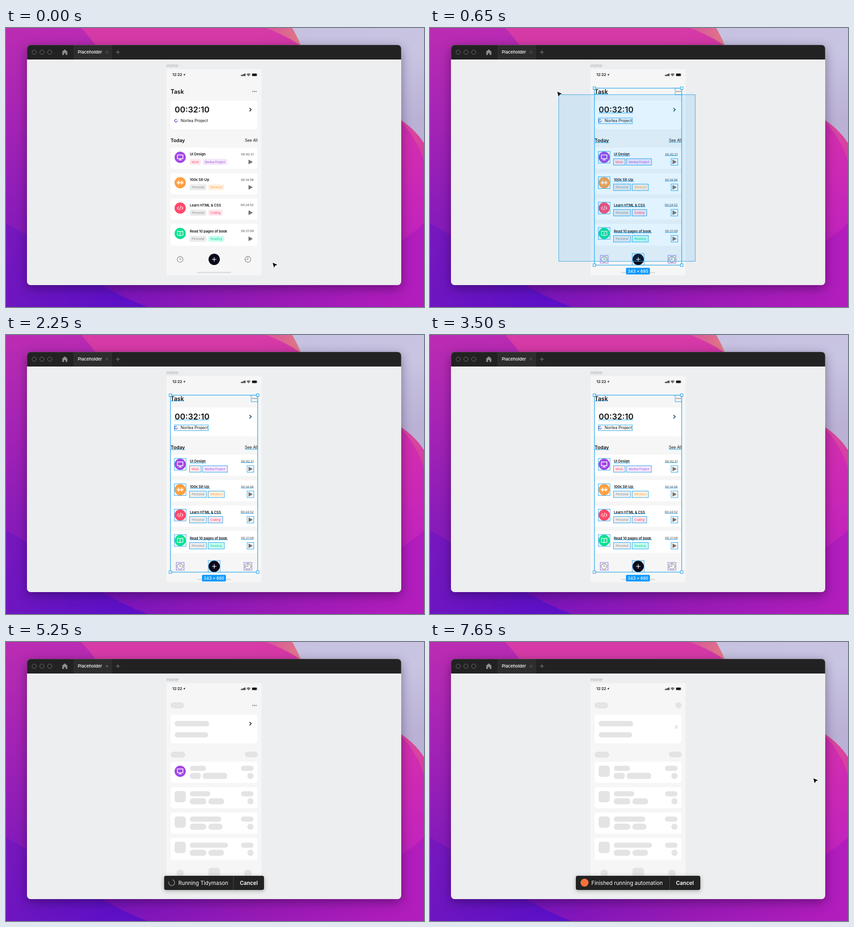
Write an HTML page that moves like this. It is 917 by 611 pixels and loops after 8000 ms.

```html
<!DOCTYPE html>
<html lang="en">
<head>
<meta charset="utf-8">
<title>Placeholder</title>
<style>
  html, body { margin: 0; width: 100%; height: 100%; overflow: hidden; background: #a81db8; }
  svg { display: block; width: 917px; height: 611px; }
  text { font-family: Inter, Roboto, sans-serif; white-space: pre; }
  .window { filter: drop-shadow(0 7px 12px rgba(20, 0, 40, .42)); }
  .toast { filter: drop-shadow(0 2px 5px rgba(0, 0, 0, .3)); }
  .line { fill: none; stroke-linecap: round; stroke-linejoin: round; }
  .pick { fill: none; stroke: #1ba0ea; }
  .comp { stroke: #8a6be0; }
  .bone { fill: #e4e4e4; }
</style>
</head>
<body>
<svg viewBox="0 0 917 611" xmlns="http://www.w3.org/2000/svg">
  <defs>
    <linearGradient id="base" x1="0" y1="0" x2=".12" y2="1">
      <stop offset="0" stop-color="#bb2cb2"/><stop offset=".38" stop-color="#a122b5"/>
      <stop offset=".65" stop-color="#8a1cb9"/><stop offset="1" stop-color="#7617bd"/>
    </linearGradient>
    <linearGradient id="rose" gradientUnits="userSpaceOnUse" x1="560" y1="0" x2="800" y2="611">
      <stop offset="0" stop-color="#d63aa6"/><stop offset=".55" stop-color="#d02db0"/>
      <stop offset=".8" stop-color="#c324bb"/><stop offset="1" stop-color="#ac1cba"/>
    </linearGradient>
    <linearGradient id="salmon" gradientUnits="userSpaceOnUse" x1="570" y1="0" x2="650" y2="30">
      <stop offset="0" stop-color="#d6549f"/><stop offset="1" stop-color="#e37a83"/>
    </linearGradient>
    <linearGradient id="mist" x1="0" y1="0" x2=".4" y2="1">
      <stop offset="0" stop-color="#c6c1e0"/><stop offset=".5" stop-color="#c8c5e2"/><stop offset="1" stop-color="#bbb1d5"/>
    </linearGradient>
    <linearGradient id="edge" gradientUnits="userSpaceOnUse" x1="880" y1="200" x2="870" y2="310">
      <stop offset="0" stop-color="#d94b9b"/><stop offset="1" stop-color="#d537a9"/>
    </linearGradient>
    <linearGradient id="foot" x1="0" y1="0" x2="1" y2="0">
      <stop offset="0" stop-color="#7614bc"/><stop offset=".5" stop-color="#961ab5"/><stop offset="1" stop-color="#b31dbd"/>
    </linearGradient>
    <linearGradient id="deep" x1="0" y1="0" x2="1" y2=".4">
      <stop offset="0" stop-color="#7718bd"/><stop offset="1" stop-color="#5d10c6"/>
    </linearGradient>
    <clipPath id="frame"><rect x="46" y="37" width="821" height="526" rx="8"/></clipPath>
  </defs>

  <rect width="917" height="611" fill="url(#base)"/>
  <path d="M165 0C205 40 240 110 300 200L600 611H917V0Z" fill="url(#rose)"/>
  <path d="M570 0C602 12 632 26 660 50L700 0Z" fill="url(#salmon)"/>
  <path d="M800 160C850 182 895 222 917 292V200Z" fill="url(#edge)"/>
  <path d="M628 0C637 16 643 28 650 46L700 130L840 186C876 204 900 226 917 252V0Z" fill="url(#mist)"/>
  <path d="M0 428C30 444 60 462 110 500C180 550 250 586 310 611H0Z" fill="url(#deep)"/>
  <path d="M180 540C225 575 270 596 312 611H917V428C890 452 850 480 800 505L500 550Z" fill="url(#foot)"/>

  <g class="window"><rect x="46" y="37" width="821" height="526" rx="8" fill="#edeeef"/></g>
  <g clip-path="url(#frame)">
    <rect x="46" y="37" width="821" height="32" fill="#222"/>
    <rect x="148" y="37" width="85" height="32" fill="#2d2d2d"/>
  </g>
  <rect x="46.5" y="37.5" width="820" height="525" rx="7.5" fill="none" stroke="#fff" stroke-opacity=".14"/>
  <g class="line" stroke="#757575">
    <circle cx="62" cy="53" r="4.8"/><circle cx="79" cy="53" r="4.8"/><circle cx="96" cy="53" r="4.8"/>
    <path d="M241.5 53h8M245.500 49v8" stroke="#8c8c8c"/>
    <path id="close" d="M219 50.500l5 5m0-5l-5 5" stroke="#6a6a6a"/>
  </g>
  <circle id="dirty" cx="221.500" cy="53" r="2.400" fill="#5c5c5c"/>
  <path d="M129 46.800l5.600 4.800v7.400h-3.800v-4h-3.600v4h-3.800v-7.400z" fill="#8d8d8d"/>

  <rect x="352" y="90" width="208.500" height="451.500" fill="#f6f6f6"/>
  <g fill="#111">
    <path d="M388.500 102.400l5-2.400-2.400 5-.3-2.300z"/>
    <rect x="515.500" y="102.800" width="1.800" height="2.400" rx=".5"/><rect x="518.100" y="101.800" width="1.800" height="3.400" rx=".5"/>
    <rect x="520.700" y="100.700" width="1.800" height="4.500" rx=".5"/><rect x="523.300" y="99.500" width="1.800" height="5.700" rx=".5"/>
    <rect x="540" y="100" width="10" height="5" rx="1.200"/>
    <path d="M551 101.500v2" stroke="#777" stroke-width=".7"/>
  </g>
  <rect x="539.400" y="99.400" width="11.200" height="6.200" rx="1.700" fill="none" stroke="#888" stroke-width=".5"/>
  <path class="line" d="M528.500 101.600q3.600-3 7.200 0M529.900 103.200q2.200-1.800 4.400 0M531.600 104.700h1" stroke="#111" stroke-width="1.200"/>
  <g fill="#fff">
    <rect x="361" y="159" width="191" height="63" rx="6"/>
    <rect x="361" y="262" width="191" height="46.500" rx="6"/>
    <rect x="361" y="318" width="191" height="46" rx="6"/>
    <rect x="361" y="373.500" width="191" height="46.300" rx="6"/>
    <rect x="361" y="429" width="191" height="48" rx="6"/>
  </g>
  <rect x="419" y="534" width="75" height="2.800" rx="1.400" fill="#dcdcdc"/>
  <g id="labels"></g>
  <g id="items"></g>
  <g id="picks"></g>
  <g id="bounds">
    <rect id="box" class="pick" stroke-width="1.200"/>
    <g id="handles" fill="#fff" stroke="#1ba0ea" stroke-width="1.100"></g>
    <rect id="tag" width="52.500" height="14.500" rx="2" fill="#0d99ff"/>
    <text id="size" font-size="9" font-weight="500" fill="#fff" text-anchor="middle"></text>
  </g>
  <rect id="marquee" fill="#0d99ff" fill-opacity=".12" stroke="#3ba7e8"/>
  <g id="toasts"></g>
  <path id="cursor" d="M0 0L10.200 4.600L5.300 6.300L3 11Z" fill="#000" stroke="#fff" stroke-width="1.600" stroke-linejoin="round" paint-order="stroke"/>
</svg>
<script>
const $ = id => document.getElementById(id);
const LOOP = 8000, DRAG = 50, DROP = 900, RUN = 3600, FIRST = 3730, STEP = 50, DONE = 5500, SAVED = 5850;
const SCALE = 0.558;

const text = (x, cy, size, str, weight = 400, fill = '#111', anchor = 'start') =>
  `<text x="${x}" y="${cy + size * .364}" font-size="${size}" font-weight="${weight}" fill="${fill}" text-anchor="${anchor}">${str}</text>`;
const line = (d, color, width) => `<path class="line" d="${d}" stroke="${color}" stroke-width="${width}"/>`;
const disc = (x, y, r, fill) => `<circle cx="${x}" cy="${y}" r="${r}" fill="${fill}"/>`;
const ring = (x, y, r, color, width) => `<circle cx="${x}" cy="${y}" r="${r}" fill="none" stroke="${color}" stroke-width="${width}"/>`;
const rect = (x, y, w, h, r, attrs) => `<rect x="${x}" y="${y}" width="${w}" height="${h}" rx="${r}" ${attrs}/>`;
const outline = (b, cls) => rect(b.x - .5, b.y - .4, b.w + 1, b.h + .8, 0, `class="pick ${cls}"`);
const underline = (b, y) => `<path class="pick" d="M${b.x} ${y}h${b.w}"/>`;

$('labels').innerHTML =
  text(157.5, 53, 9.4, 'Placeholder', 500, '#fff') +
  text(352, 83, 9.3, 'Home', 400, '#a9abad') +
  text(365, 102.4, 8.2, '12:22', 600);

// Items are listed in the order in which they turn into placeholders.
const items = [];
function add(x, y, w, h, r, art, pick) {
  const b = { x, y, w, h };
  items.push({ ...b, art, bone: rect(x, y, w, h, r, 'class="bone"'), pick: pick(b) });
}
const boxed = b => outline(b, '');
const comp = b => outline(b, 'comp');
const ruled = y => b => underline(b, y);

add(361, 132, 29.3, 13.5, 6.5, text(361, 139, 12.8, 'Task', 600), ruled(144.5));
add(370, 173, 75.7, 11.5, 5.7, text(370, 179, 17.8, '00:32:10', 600), ruled(186));
add(370, 197.5, 73.5, 11.5, 5.7,
  ring(373, 203, 2.9, '#b99bdd', 1.2) + line('M373 200.100a2.900 2.900 0 1 0 2.500 4.400', '#6a35a8', 1.2) +
  text(383, 203, 8.9, 'Norlea Project'), boxed);
add(361, 240, 32.3, 13, 6.5, text(361, 246.6, 10.7, 'Today', 600), ruled(251));
add(524, 240, 28, 12.5, 6.2, text(552, 246.3, 8.6, 'See All', 400, '#111', 'end'), ruled(250.3));
add(374, 498.5, 16.2, 16, 7, ring(382, 506.7, 6.3, '#8b8b8b', 1.2) + line('M382 503v4h3', '#8b8b8b', 1.1), comp);
add(444.3, 494.3, 24.8, 24.8, 6,
  disc(456.7, 506.7, 12.4, '#0a0a1c') + line('M452.500 506.700h8.400m-4.200-4.200v8.400', '#fff', 1.3), boxed);
add(522.6, 498.5, 16.2, 16, 7,
  ring(530.7, 506.7, 6.4, '#8b8b8b', 1.2) + line('M530.700 500.300v6.400h-4.800', '#8b8b8b', 1.1), comp);

// Glyphs are centred on 0,0.
const glyphs = {
  screen: line('M-6-5h12v8.200h-12zM-3 6h6M0 3.500v2', '#fff', 1.5),
  weight: line('M-3 0h6', '#fff', 2) + line('M-3.200-3.300v6.600M3.200-3.300v6.600', '#fff', 2.2) + line('M-6-1.500v3M6-1.500v3', '#fff', 1.7),
  code: line('M-3.300-3l-3 3 3 3M3.300-3l3 3-3 3M1.300-4.500l-2.600 9', '#fff', 1.2),
  book: line('M0-3.800c-1.500-1.200-3.500-1.200-6-1.200v9c2.500 0 4.500 0 6 1.200c1.500-1.200 3.500-1.200 6-1.200v-9c-2.500 0-4.500 0-6 1.200zv8.500', '#fff', 1.3)
};
const gray = ['#ececec', '#8b8b8b'];
const cards = [
  { name: 'UI Design', w: 35.5, time: '00:42:21', color: '#a048e4', glyph: 'screen',
    chips: [['Work', 403, 24.5, '#ffe8ed', '#ff4d72'], ['Norlea Project', 431.5, 54, '#f3e8fc', '#a048e4']] },
  { name: '100x Sit-Up', w: 44.7, time: '00:14:06', color: '#ff9f43', glyph: 'weight',
    chips: [['Personal', 403, 36.5, ...gray], ['Workout', 444, 34.5, '#fff1e2', '#ff9f43']] },
  { name: 'Learn HTML &amp; CSS', w: 69, time: '00:24:52', color: '#ff4a6c', glyph: 'code',
    chips: [['Personal', 403, 36.5, ...gray], ['Coding', 444, 31, '#ffe6eb', '#f9406a']] },
  { name: 'Read 10 pages of book', w: 83.7, time: '00:21:09', color: '#08e192', glyph: 'book',
    chips: [['Personal', 403, 36.5, ...gray], ['Reading', 444, 34.5, '#c9fff0', '#0cd39c']] }
];
for (let i = 3; i >= 0; i--) {
  const c = cards[i], dy = 55.6 * i, ty = dy + (i === 3 ? 1.5 : 0);
  const mid = 276.7 + ty, low = 293.3 + ty, icon = 283.1 + dy;
  add(529.5, low - 6.8, 13.6, 13.6, 6.8,
    `<path d="M532.700 ${low - 4}l7.500 4-7.500 4z" fill="#777" stroke="#777" stroke-width="1.500" stroke-linejoin="round"/>`, boxed);
  for (const [label, x, w, bg, fg] of [...c.chips].reverse())
    add(x, low - 6.7, w, 13.4, 6.7,
      rect(x, low - 6.7, w, 13.4, 3, `fill="${bg}"`) + text(x + w / 2, low, 6.6, label, 400, fg, 'middle'), boxed);
  add(403.3, mid - 5.6, c.w, 11.2, 5.6, text(403.3, mid, 7.5, c.name, 600), ruled(mid + 3.6));
  add(515.5, mid - 5.6, 27.5, 11.2, 5.6, text(543.3, mid - .2, 6.7, c.time, 400, '#444', 'end'), ruled(mid + 2.8));
  add(369.8, icon - 12.4, 24.6, 24.8, 6,
    disc(382.1, icon, 12.3, c.color) + `<g transform="translate(382.100 ${icon})">${glyphs[c.glyph]}</g>`, boxed);
}
const chevron = 'M534.700 175.500l3.300 3.300-3.300 3.300';
add(538, 182, 5, 8, 2.5, line(chevron, '#111', 1.5), () => line(chevron, 'rgba(13,130,220,.55)', 1.5));
add(538.3, 132, 13.6, 13.6, 6.8, [541.3, 545, 548.7].map(x => disc(x, 139, 1.2, '#777')).join(''), boxed);

$('items').innerHTML = items.map(i => `<g><g>${i.art}</g>${i.bone}</g>`).join('');
$('picks').innerHTML = items.map(i => `<g>${i.pick}</g>`).join('');
$('handles').innerHTML = rect(0, 0, 5.6, 5.6, 0, '').repeat(4);

const toast = (id, x, w, split, label, labelX, icon) =>
  `<g id="${id}" class="toast">${rect(x, 512, w, 31, 4, 'fill="#222"')}<path d="M${split} 512v31" stroke="#4a4a4a"/>` +
  icon + text(labelX, 527.3, 11.7, label, 400, '#fff') + text(split + 14, 527.3, 11.7, 'Cancel', 600, '#fff') + '</g>';
$('toasts').innerHTML =
  toast('running', 347, 219, 499, 'Running Tidymason', 378,
    `<g id="spinner">${line('M0-6.500A6.500 6.500 0 1 1-6.500 0', '#a8a8a8', 1.2)}</g>`) +
  toast('finished', 320, 273, 525.5, 'Finished running automation', 354, disc(339, 527, 8.8, '#f5713a'));

const clamp = v => Math.min(1, Math.max(0, v));
const inOut = (p, n) => p < .5 ? .5 * (2 * p) ** n : 1 - .5 * (2 - 2 * p) ** n;
const out = p => 1 - (1 - p) ** 3;
const mix = (a, b, p) => a + (b - a) * p;
const show = (el, on) => el.setAttribute('display', on ? 'inline' : 'none');
const set = (el, attrs) => { for (const k in attrs) el.setAttribute(k, attrs[k]); };

const START = [582, 511], END = [273, 122];
function dragPoint(t) {
  const p = clamp((t - DRAG) / 800);
  return [mix(START[0], END[0], inOut(p, 4)), mix(START[1], END[1], inOut(p, 3))];
}

function cursorAt(t) {
  if (t < 1250) {
    const [x, y] = dragPoint(t + 20), off = 3 * (1 - clamp(t / 150));
    return [x + off, y + off];
  }
  if (t < 1700) {
    const p = clamp((t - 1250) / 400) ** 2;
    return [mix(273, 330, p), mix(122, -25, p)];
  }
  if (t < 6300) return null;
  const p = out(clamp((t - 6300) / 350));
  return [mix(896, 841, p), mix(330, 298.5, p)];
}

function drawSelection(t) {
  const dragging = t >= DRAG && t < DROP, [mx, my] = dragPoint(t);
  show($('marquee'), dragging);
  if (dragging) set($('marquee'), { x: mx, y: my, width: START[0] - mx, height: START[1] - my });

  const chosen = items.filter((it, i) => {
    const hit = dragging
      ? it.x + it.w > mx && it.y + it.h + 2 > my && it.x < START[0] && it.y < START[1]
      : t >= DROP && t < RUN + 50;
    show($('picks').children[i], hit);
    return hit;
  });
  show($('bounds'), chosen.length > 0);
  if (!chosen.length) return;
  const x = Math.min(...chosen.map(i => i.x)) - .3, y = Math.min(...chosen.map(i => i.y)) - .3;
  const r = Math.max(...chosen.map(i => i.x + i.w)) + .2, b = Math.max(...chosen.map(i => i.y + i.h)) + .2;
  set($('box'), { x, y, width: r - x, height: b - y });
  [[x, y], [r, y], [x, b], [r, b]].forEach(([hx, hy], i) =>
    set($('handles').children[i], { x: hx - 2.8, y: hy - 2.8 }));
  const cx = (x + r) / 2;
  set($('tag'), { x: cx - 26.5, y: b + 6 });
  set($('size'), { x: cx - .2, y: b + 16.5 });
  $('size').textContent = `${Math.round((r - x) / SCALE)} × ${Math.round((b - y) / SCALE)}`;
}

function draw(t) {
  items.forEach((_, i) => {
    const [art, bone] = $('items').children[i].children, swapped = t >= FIRST + STEP * i;
    show(art, !swapped);
    show(bone, swapped);
  });
  drawSelection(t);

  const dirty = t >= FIRST && t < SAVED;
  show($('dirty'), dirty);
  show($('close'), !dirty);
  show($('running'), t >= RUN && t < DONE);
  show($('finished'), t >= DONE);
  set($('spinner'), { transform: `translate(363.500 527) rotate(${(t - 4200) * .36})` });

  const at = cursorAt(t);
  show($('cursor'), at);
  if (at) set($('cursor'), { transform: `translate(${at})` });
}

const begin = performance.now();
function tick() {
  draw((performance.now() - begin) % LOOP);
  requestAnimationFrame(tick);
}
tick();
</script>
</body>
</html>
```
